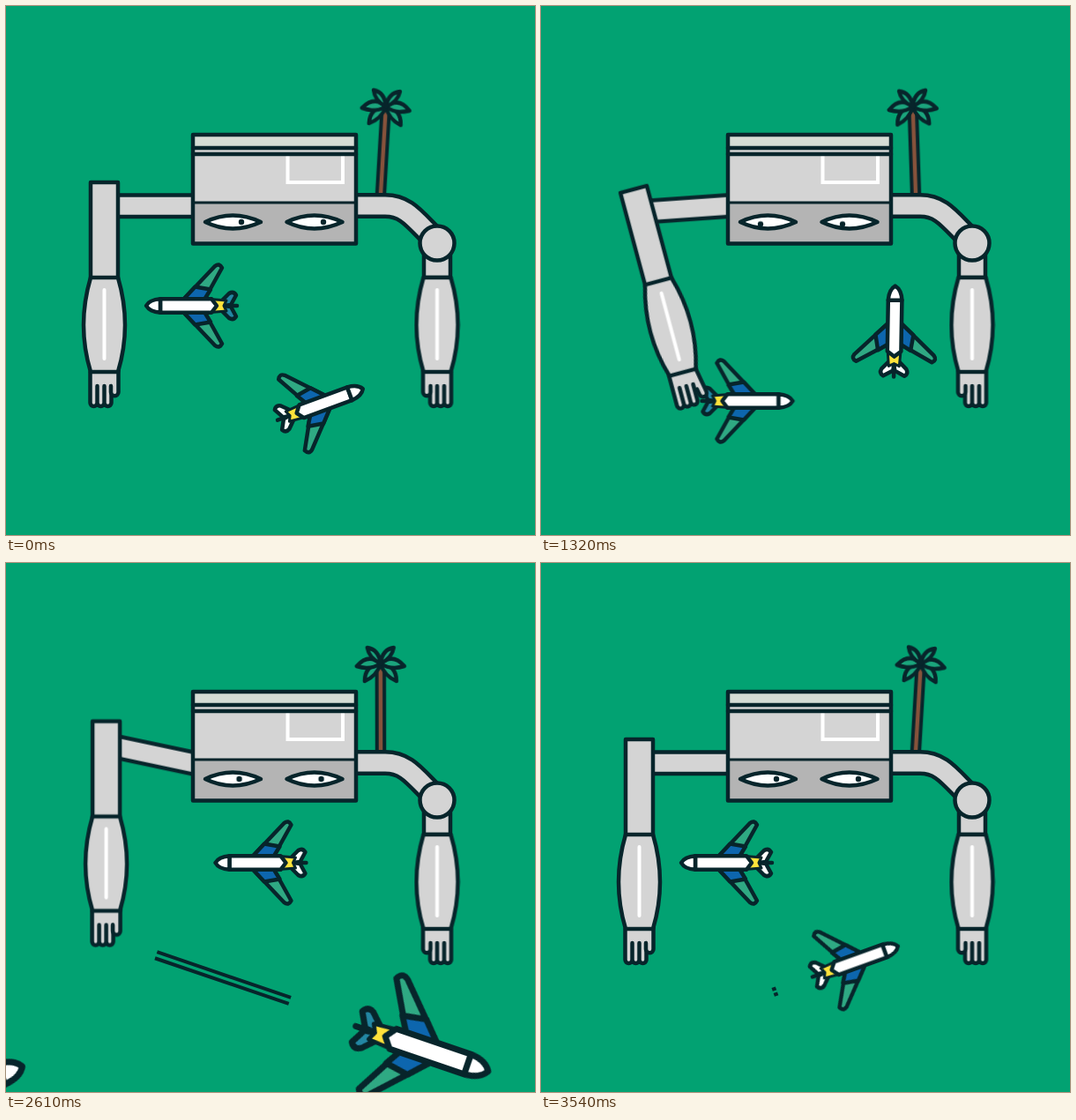
Recreate the animation shown at these times as an HTML page without scripts. Size 600x600 px, loop 3.57 s.

```html
<!DOCTYPE html>
<html lang="en">
<head>
<meta charset="utf-8">
<title>Airport</title>
<style>
  html, body { margin: 0; width: 100%; height: 100%; overflow: hidden; background: #02a272; }
  svg { display: block; width: 100vw; height: 100vh; }
  .ink { stroke: #07252b; stroke-width: 4.5; stroke-linejoin: round; stroke-linecap: round; }
  .grey { fill: #d4d4d4; }
  .shine { stroke: #fff; stroke-width: 4; fill: none; stroke-linecap: round; }
  .moves { animation: 3.57s linear infinite; }

  .blue-tail { --tail: #2387a3; }
  .white-tail { --tail: #fff; }

  #taxi { offset-path: path("M212,340 C130,340 140,464 241.6,446.4"); animation-name: taxi, first; animation-timing-function: linear, step-end; }
  @keyframes taxi {
    0% { offset-distance: 0%; animation-timing-function: cubic-bezier(.4,0,.3,1); }
    25.2%, 100% { offset-distance: 100%; }
  }
  @keyframes first { 0% { opacity: 1; } 25.2%, 100% { opacity: 0; } }

  #depart { animation-name: depart, later; animation-timing-function: linear, step-end; }
  @keyframes depart {
    0%, 25.2% { transform: translate(241.6px,446.4px) rotate(-9.9deg) scale(1); animation-timing-function: ease-in-out; }
    37% { transform: translate(232.5px,448px) rotate(0deg) scale(1); animation-timing-function: cubic-bezier(.4,0,.3,1); }
    50.4% { transform: translate(180px,447px) rotate(16.7deg) scale(1); animation-timing-function: ease-out; }
    58.8% { transform: translate(180px,447px) rotate(18.8deg) scale(1); animation-timing-function: cubic-bezier(.4,.1,.7,.75); }
    73.1% { transform: translate(469px,550px) rotate(18.8deg) scale(1.54); }
    85.7% { transform: translate(677px,621px) rotate(18.8deg) scale(1.9); }
    90.8%, 100% { transform: translate(790px,660px) rotate(18.8deg) scale(2); }
  }
  @keyframes later { 0% { opacity: 0; } 25.2%, 100% { opacity: 1; } }

  #queue { offset-path: path("M355,452.5 C370,447 392,423 399.3,388.6 C400.5,382 401,376 401,367 C401,350 390,340 372,340 H212"); animation-name: queue; }
  @keyframes queue {
    0% { offset-distance: 0px; animation-timing-function: cubic-bezier(.35,0,.12,1); }
    50.4%, 56.5% { offset-distance: 102.5px; animation-timing-function: cubic-bezier(.4,0,.2,1); }
    98%, 100% { offset-distance: 307.2px; }
  }

  #land { animation-name: land; }
  @keyframes land {
    0%, 69.7% { transform: translate(-124px,622px) rotate(-19.8deg) scale(1.66); }
    73.1% { transform: translate(-62px,600px) rotate(-19.8deg) scale(1.6); }
    85.7% { transform: translate(171px,517px) rotate(-19.8deg) scale(1.376); }
    91.2% { transform: translate(288px,475.6px) rotate(-19.8deg) scale(1.14); animation-timing-function: cubic-bezier(.2,.48,.5,1); }
    99.2%, 100% { transform: translate(355px,452.5px) rotate(-19.8deg) scale(1); }
  }

  .trail { fill: none; stroke: #07252b; stroke-width: 4; stroke-dasharray: 1 2; }
  #skid-out { animation-name: skid-out; }
  @keyframes skid-out {
    0%, 60.5% { stroke-dashoffset: 1; animation-timing-function: ease-in; }
    69.5%, 73.1% { stroke-dashoffset: 0; }
    81.5%, 100% { stroke-dashoffset: -1; }
  }
  #skid-in { animation-name: skid-in; }
  @keyframes skid-in {
    0%, 87.4% { stroke-dashoffset: 1; }
    92.4% { stroke-dashoffset: 0; animation-timing-function: ease-out; }
    99.2% { stroke-dashoffset: -.94; }
    99.7%, 100% { stroke-dashoffset: -1; }
  }

  #shoulder { transform-origin: 211px 226px; animation-name: shoulder; }
  @keyframes shoulder {
    0%, 4.2% { transform: rotate(0deg); animation-timing-function: ease-in-out; }
    23.5%, 37% { transform: rotate(-4deg); animation-timing-function: cubic-bezier(.4,0,.3,1); }
    50.4% { transform: rotate(10deg); animation-timing-function: ease-out; }
    59.7%, 72.3% { transform: rotate(12deg); animation-timing-function: ease-in-out; }
    91.6%, 100% { transform: rotate(0deg); }
  }
  #arm { transform-origin: 112px 226px; animation-name: arm; }
  @keyframes arm {
    0%, 4.2% { transform: rotate(0deg); animation-timing-function: ease-in-out; }
    23.5% { transform: rotate(-10.3deg); }
    37% { transform: rotate(-11deg); animation-timing-function: cubic-bezier(.4,0,.3,1); }
    50.4% { transform: rotate(-12.2deg); animation-timing-function: ease-out; }
    59.7%, 72.3% { transform: rotate(-12deg); animation-timing-function: ease-in-out; }
    91.6%, 100% { transform: rotate(0deg); }
  }
  #grip { transform-origin: 123px 418px; animation-name: grip; }
  @keyframes grip {
    0%, 17% { transform: translate(0,0) rotate(0deg); animation-timing-function: ease-in-out; }
    23.5%, 55.5% { transform: translate(1px,6px) rotate(-10deg); animation-timing-function: ease-in-out; }
    60%, 100% { transform: translate(0,0) rotate(0deg); }
  }

  #pupils { animation-name: look; }
  @keyframes look {
    0%, 5% { transform: translate(0,0); animation-timing-function: ease-in-out; }
    22%, 37% { transform: translate(-18px,2.5px); animation-timing-function: ease-in-out; }
    50.4%, 56% { transform: translate(-24px,2px); animation-timing-function: ease-in-out; }
    73.1% { transform: translate(-2.5px,0); }
    82%, 100% { transform: translate(0,0); }
  }

  #palm { transform-origin: 425px 213px; animation-name: sway; animation-timing-function: cubic-bezier(.37,0,.63,1); }
  @keyframes sway {
    0%, 100% { transform: rotate(3.4deg); }
    50% { transform: rotate(-2.9deg); }
  }
</style>
</head>
<body>
<svg viewBox="0 0 600 600">
  <defs>
    <g id="wing">
      <path d="M11,-7 L-25,-45 Q-30,-49 -33,-43 L-13,-7Z" fill="#2fa983"/>
      <path d="M11,-7 L-2.5,-21.5 L-20,-18.5 L-13,-7Z" fill="#0d66ae"/>
      <path d="M-32,-5 L-41,-14 Q-46,-17 -49,-12 L-43,-1 L-36,0Z" fill="var(--tail)"/>
    </g>
    <g id="plane" class="ink">
      <use href="#wing"/>
      <use href="#wing" transform="scale(1 -1)"/>
      <path d="M-37,0 H-50"/>
      <path d="M-20,-7.5 L-38,-6 L-35,0 L-38,6 L-20,7.5Z" fill="#ffe23b" stroke-width="3"/>
      <path d="M37,-7.8 H-21 L-27,0 L-21,7.8 H37Z" fill="#fff"/>
      <path d="M37,-7.8 Q49,-7 53,0 Q49,7 37,7.8Z" fill="#fff"/>
    </g>
    <g id="fronds">
      <path d="M0,0 Q18,2 18,20 Q4,14 0,0Z"/>
      <path d="M0,0 Q14,-12 27,3 Q12,8 0,0Z"/>
      <path d="M0,0 Q2,-16 15,-18 Q13,-6 0,0Z"/>
    </g>
    <path id="thumb" class="ink grey" d="M119,431 V438 a4.2 4.2 0 0 0 8.5 0 V409"/>
    <g id="forearm" class="ink grey">
      <path d="M95.5,415 V450 a4 4 0 0 0 8 0 a4 4 0 0 0 8 0 a4 4 0 0 0 8 0 V438 H127.5 V415Z" stroke="none"/>
      <path d="M95.5,415 V450 a4 4 0 0 0 8 0 V431 M103.5,450 a4 4 0 0 0 8 0 V431 M111.5,450 a4 4 0 0 0 8 0 V431"/>
    </g>
    <g id="muscle">
      <path class="ink grey" d="M96,308 Q80,362 96,415 H127 Q143,362 127,308Z"/>
      <path class="shine" d="M111.5,322 V400"/>
    </g>
    <path id="eye" class="ink" d="M226,245 Q257,230 289,245 Q257,260 226,245Z" fill="#fff"/>
  </defs>

  <rect width="600" height="600" fill="#02a272"/>

  <g transform="translate(169.5 444.5) rotate(18.8)">
    <g id="skid-out" class="trail moves">
      <path pathLength="1" d="M0,-3.7 H161"/><path pathLength="1" d="M0,3.7 H161"/>
    </g>
  </g>
  <g transform="translate(195 511) rotate(-19.5)">
    <g id="skid-in" class="trail moves">
      <path pathLength="1" d="M0,-3.2 H77"/><path pathLength="1" d="M0,3.2 H77"/>
    </g>
  </g>

  <g id="queue" class="moves white-tail"><use href="#plane"/></g>
  <g id="taxi" class="moves blue-tail"><use href="#plane"/></g>
  <g id="depart" class="moves blue-tail"><use href="#plane"/></g>
  <g id="land" class="moves white-tail"><use href="#plane"/></g>

  <g id="palm" class="moves">
    <path d="M425,216 V116" stroke="#07252b" stroke-width="12.5"/>
    <path d="M425,216 V120" stroke="#86523b" stroke-width="4.5"/>
    <g class="ink" fill="#1ba57d" transform="translate(425 114)">
      <use href="#fronds"/>
      <use href="#fronds" transform="scale(-1 1)"/>
    </g>
  </g>

  <!-- right arm -->
  <g fill="none">
    <path d="M390,226.5 H430 C455,226.5 464,243 489,267" stroke="#07252b" stroke-width="29"/>
    <path d="M390,226.5 H430 C455,226.5 464,243 489,267" stroke="#d4d4d4" stroke-width="20"/>
  </g>
  <rect class="ink grey" x="474" y="270" width="30" height="38"/>
  <circle class="ink grey" cx="489" cy="269" r="19.5"/>
  <g transform="translate(600.5 0) scale(-1 1)">
    <use href="#forearm"/>
    <use href="#thumb"/>
    <use href="#muscle"/>
  </g>

  <!-- left arm -->
  <g id="shoulder" class="moves">
    <rect class="ink grey" x="112" y="214.5" width="108" height="24.5"/>
    <g id="arm" class="moves">
      <rect class="ink grey" x="96" y="200" width="31" height="110"/>
      <use href="#forearm"/>
      <g id="grip" class="moves"><use href="#thumb"/></g>
      <use href="#muscle"/>
    </g>
  </g>

  <!-- terminal -->
  <rect x="212" y="146" width="185" height="78" fill="#d4d4d4"/>
  <rect x="212" y="146" width="185" height="15" fill="#d5ddd5"/>
  <rect x="212" y="223" width="185" height="46" fill="#b4b4b4"/>
  <path class="shine" d="M319.5,170 V200 H382 V170" stroke-linecap="butt"/>
  <g class="ink" fill="none">
    <path d="M212,161 H397 M212,168 H397"/>
    <path d="M212,223 H397" stroke-width="3"/>
    <rect x="212" y="146" width="185" height="123.5"/>
  </g>
  <use href="#eye"/>
  <use href="#eye" x="92.5"/>
  <g id="pupils" class="moves" fill="#07252b">
    <circle cx="267" cy="245" r="3.2"/>
    <circle cx="360" cy="245" r="3.2"/>
  </g>
</svg>
</body>
</html>
```
